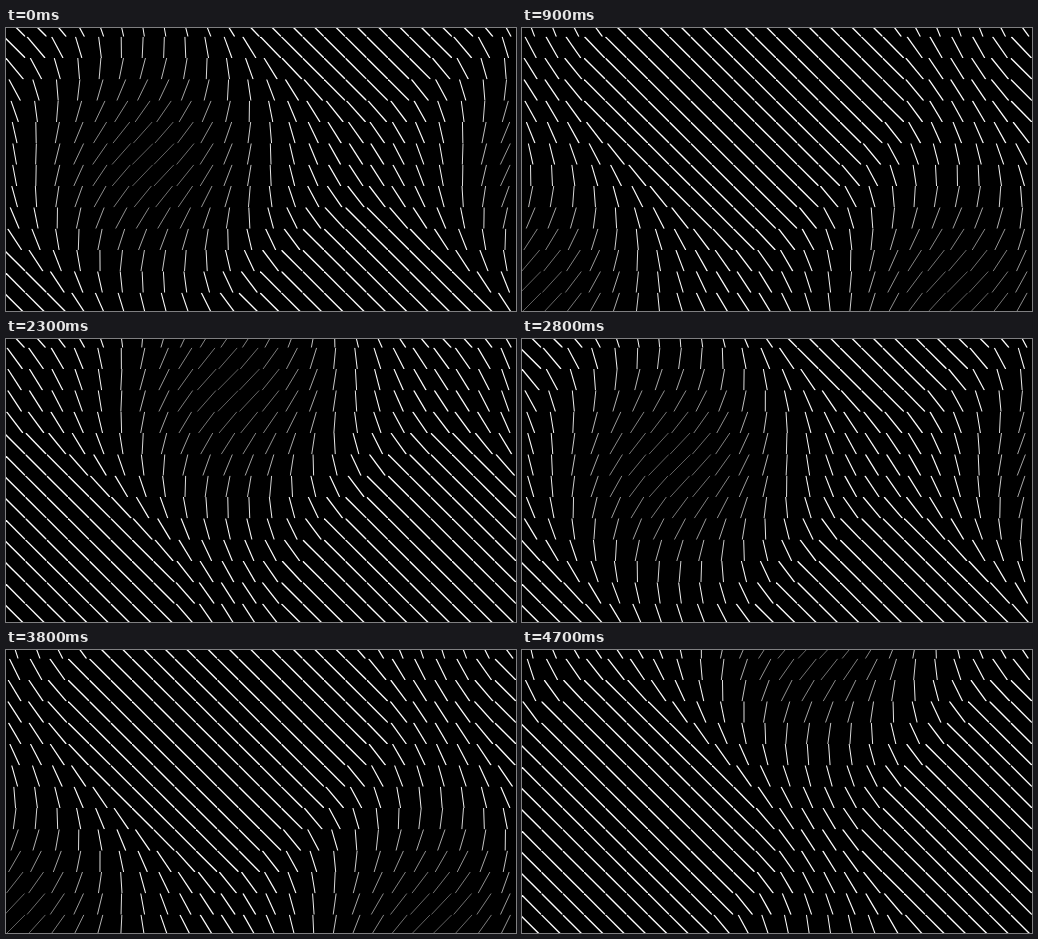
An HTML page with a canvas that plays this animation: 510x283 px, repeating every 4.8 s.

```html
<!DOCTYPE html>
<html lang="en">
<head>
<meta charset="utf-8">
<title>Line field</title>
<style>
  html, body { margin: 0; width: 100%; height: 100%; overflow: hidden; background: #000; }
  canvas { display: block; }
</style>
</head>
<body>
<canvas id="stage" width="510" height="283"></canvas>
<script>
  const ctx = document.getElementById("stage").getContext("2d");
  const CELL = 64 / 3, HALF = CELL / 2;
  const COLS = 24, ROWS = 14;
  const LEFT = -2, TOP = -38 / 3;
  const STEP_MS = 100, STEPS = 48, PHASE_STEP = 0.22;
  const K = 2 * Math.PI / (20 * CELL);
  const CENTER = { x: 144, y: 132 };
  const MAX_TILT = Math.PI / 4;
  const THIN = 0.38, THICK = 1.38;

  function drawCell(x, y, phase) {
    const wave = Math.cos(K * (x - CENTER.x) + phase) + Math.cos(K * (y - CENTER.y) - phase);
    const tilt = Math.min(MAX_TILT, 0.677 * (0.84 - wave));
    const dx = HALF * Math.tan(tilt);
    ctx.save();
    // Each line is cut off at the edges of its cell
    ctx.beginPath();
    ctx.rect(x - HALF, y - HALF, CELL, CELL);
    ctx.clip();
    ctx.lineWidth = THIN + (THICK - THIN) * (tilt + MAX_TILT) / (2 * MAX_TILT);
    ctx.beginPath();
    ctx.moveTo(x - dx, y - HALF);
    ctx.lineTo(x + dx, y + HALF);
    ctx.stroke();
    ctx.restore();
  }

  function draw(step) {
    ctx.fillStyle = "#000";
    ctx.fillRect(0, 0, 510, 283);
    ctx.strokeStyle = "#fff";
    for (let row = 0; row < ROWS; row++) {
      for (let col = 0; col < COLS; col++) {
        drawCell(LEFT + (col + 0.5) * CELL, TOP + (row + 0.5) * CELL, step * PHASE_STEP);
      }
    }
  }

  const start = performance.now();
  let shown = -1;
  function tick() {
    const step = Math.floor((performance.now() - start) / STEP_MS) % STEPS;
    if (step !== shown) draw(shown = step);
    requestAnimationFrame(tick);
  }
  tick();
</script>
</body>
</html>
```
